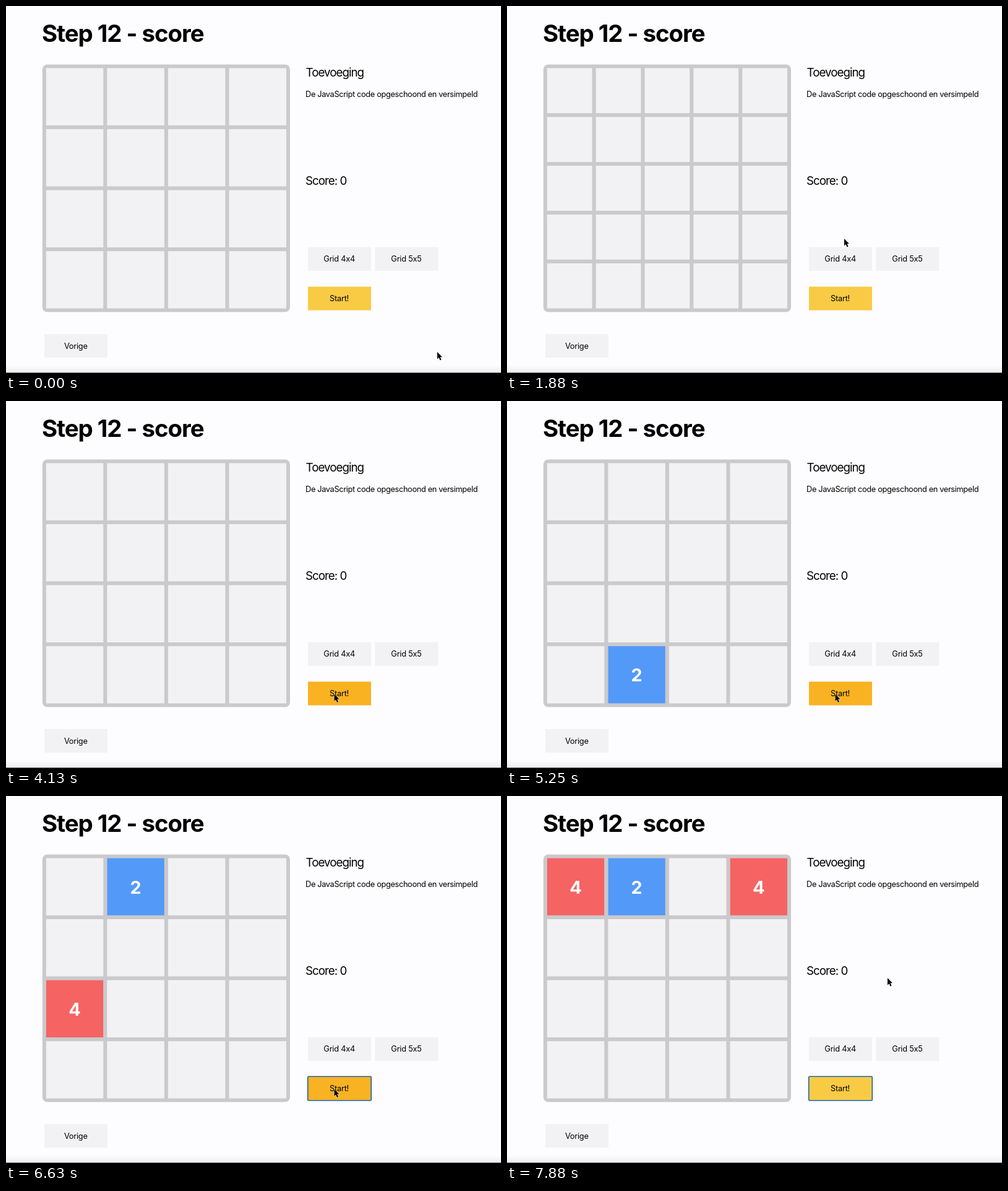
An HTML page with a canvas for the animation above (8000 ms loop, 800 by 593 pixels).

```html
<!DOCTYPE html>
<html lang="nl">
<head>
<meta charset="utf-8">
<title>Step 12 - score</title>
<style>
  html, body { margin: 0; width: 100%; height: 100%; overflow: hidden; background: #fdfcfe; }
  canvas, svg { position: absolute; left: 0; top: 0; width: 800px; height: 593px; display: block; }
  text { font-family: Inter, "Open Sans", sans-serif; font-optical-sizing: none; fill: #000; }
  .title { font-size: 38.4px; font-weight: 700; letter-spacing: -.027em; }
  .head { font-size: 18.8px; letter-spacing: -.053em; }
  .body { font-size: 12.8px; letter-spacing: -.028em; }
  .label { font-size: 12.8px; letter-spacing: -.018em; text-anchor: middle; }
</style>
</head>
<body>
<canvas id="stage" width="800" height="593"></canvas>
<svg viewBox="0 0 800 593">
  <text class="title" x="58" y="58">Step 12 - score</text>
  <text class="head" x="484.5" y="114">Toevoeging</text>
  <text class="body" x="484" y="147">De JavaScript code opgeschoond en versimpeld</text>
  <text class="head" x="484" y="289">Score: 0</text>
  <text class="label" x="538.7" y="413.3">Grid 4x4</text>
  <text class="label" x="647" y="413.3">Grid 5x5</text>
  <text class="label" x="538.5" y="477.3">Start!</text>
  <text class="label" x="112.8" y="554.2">Vorige</text>
  <path id="cursor" d="M0 0V11.4L2.6 9L4.5 13.4L6.5 12.5L4.6 8.3H8Z"
        fill="#000" stroke="#fff" stroke-width="1" stroke-linejoin="round" paint-order="stroke"/>
</svg>
<script>
const ctx = document.getElementById('stage').getContext('2d');
const cursor = document.getElementById('cursor');
const LOOP = 8000, STEP = 125;
const BOARD = { x: 64.8, y: 100.4, inner: 388.2, gap: 6.1 };
const PLAIN = ['#f2f1f3', '#dddcde'];
const YELLOW = ['#f9cb44', '#f9b221'];
const COLORS = { 2: '#5399f8', 4: '#f56363' };

const buttons = [
  { x: 488, y: 389.6, fill: PLAIN },
  { x: 596.4, y: 389.6, fill: PLAIN },
  { x: 488, y: 453.5, fill: YELLOW, ring: true },
  { x: 62, y: 530, fill: PLAIN }
];
const BUTTON_W = 102, BUTTON_H = 38.2;

// time, x, y of the pointer tip
const path = [
  [0, 697, 559], [500, 584, 470], [750, 602, 430], [875, 624, 415], [1250, 624, 415],
  [1500, 583, 456], [1875, 545, 376], [2125, 550.5, 407], [2625, 550.5, 407],
  [3500, 534, 470], [4125, 530.5, 473.5], [7375, 530.5, 473.5], [7875, 615, 294]
];

// a tile fades in at born, then may slide up between rows
const tiles = [
  { value: 2, col: 1, from: 3, to: 0, born: 4625, slide: 5375 },
  { value: 4, col: 0, from: 2, to: 0, born: 5625, slide: 6625 },
  { value: 4, col: 3, from: 0, to: 0, born: 6875, slide: LOOP }
];

const clamp = v => Math.max(0, Math.min(1, v));
const ease = v => v * v * (3 - 2 * v);
const lerp = (a, b, p) => a + (b - a) * p;

function pointerAt(t) {
  const i = path.findIndex(p => p[0] > t);
  if (i < 0) return path[path.length - 1].slice(1);
  const a = path[i - 1], b = path[i];
  const p = ease((t - a[0]) / (b[0] - a[0]));
  return [lerp(a[1], b[1], p), lerp(a[2], b[2], p)];
}

function rect(x, y, w, h, fill) {
  ctx.fillStyle = fill;
  ctx.fillRect(x, y, w, h);
}

function drawBackground() {
  rect(0, 0, 800, 593, '#fdfcfe');
  const shade = ctx.createLinearGradient(0, 580, 0, 592);
  shade.addColorStop(0, '#fdfcfe');
  shade.addColorStop(1, '#eeedef');
  rect(0, 580, 800, 12, shade);
  rect(0, 592, 800, 1, '#777678');
}

function drawGrid(n) {
  const { x, y, inner, gap } = BOARD;
  const size = (inner - gap * (n - 1)) / n;
  ctx.fillStyle = '#cac9cb';
  ctx.beginPath();
  ctx.roundRect(x - 6, y - 6, inner + 12, inner + 12, 8);
  ctx.fill();
  for (let i = 0; i < n * n; i++) {
    rect(x + (i % n) * (size + gap), y + Math.floor(i / n) * (size + gap), size, size, PLAIN[0]);
  }
  return size;
}

function drawTile(tile, t, size) {
  const pitch = size + BOARD.gap;
  const row = lerp(tile.from, tile.to, ease(clamp((t - tile.slide) / 375)));
  const x = BOARD.x + tile.col * pitch, y = BOARD.y + row * pitch;
  ctx.globalAlpha = clamp((t - tile.born) / 500);
  rect(x, y, size, size, COLORS[tile.value]);
  ctx.fillStyle = '#fff';
  ctx.font = '700 28.8px Inter, "Open Sans", sans-serif';
  ctx.textAlign = 'center';
  ctx.fillText(tile.value, x + size / 2, y + size / 2 + 11);
  ctx.globalAlpha = 1;
}

function drawButton({ x, y, fill, ring }, px, py, focused) {
  const over = px >= x && px <= x + BUTTON_W && py >= y && py <= y + BUTTON_H;
  rect(x, y, BUTTON_W, BUTTON_H, fill[+over]);
  if (ring && focused) {
    ctx.strokeStyle = '#1763b2';
    ctx.lineWidth = 1.6;
    ctx.beginPath();
    ctx.roundRect(x - .3, y - .3, BUTTON_W + .6, BUTTON_H + .6, 1.5);
    ctx.stroke();
  }
}

function frame(now) {
  const t = Math.floor((now % LOOP) / STEP) * STEP;
  const [px, py] = pointerAt(t);
  drawBackground();
  const size = drawGrid(t >= 1000 && t < 2250 ? 5 : 4);
  for (const tile of tiles) if (t >= tile.born) drawTile(tile, t, size);
  for (const button of buttons) drawButton(button, px, py, t >= 5500);
  cursor.setAttribute('transform', `translate(${px} ${py})`);
  requestAnimationFrame(frame);
}
frame(0);
</script>
</body>
</html>
```
